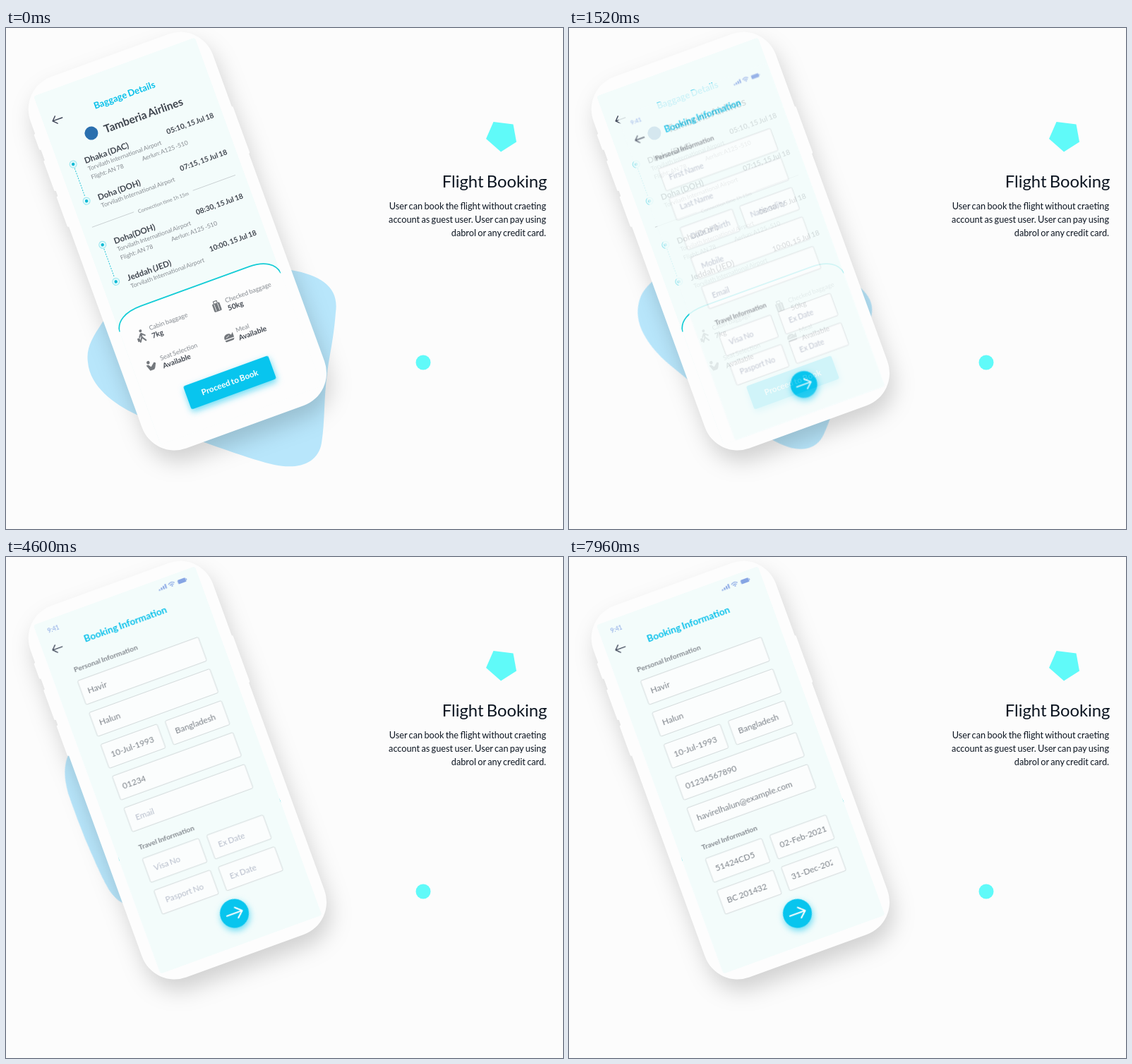
Write an HTML page that moves like this. It is 789 by 710 pixels and loops after 8 s.

```html
<!DOCTYPE html>
<html lang="en">
<head>
<meta charset="utf-8">
<title>Flight Booking</title>
<style>
  html, body { margin: 0; width: 100%; height: 100%; overflow: hidden; background: #fcfcfc; }
  svg { display: block; width: 789px; height: 710px; font-family: Lato, sans-serif; }
  text { word-spacing: -.07em; }
  .phone { filter: drop-shadow(6px 16px 15px rgba(0, 0, 0, .17)); }
  .accent { fill: #08c0ea; }
  .dark { fill: #40464f; font-weight: 700; }
  .soft { fill: #858a90; }
  .hint { fill: #b5bcca; font-size: 11.66px; }
  .value { fill: #7b8188; font-size: 12px; }
  .glow { fill: #08c5ee; filter: drop-shadow(0 4px 5px rgba(8, 197, 238, .6)); }
  .line { fill: none; stroke-linecap: round; stroke-linejoin: round; }
  .box { fill: #fbfdfd; stroke: #d0d7d9; stroke-width: .9; }

  .blob { fill: #b8e6fb; animation: drift 8s linear infinite; }
  @keyframes drift {
    0%, 1%      { transform: translate(338px, 488px); }
    15.5%       { transform: translate(300px, 470px) rotate(13deg) scale(.93); }
    19%         { transform: translate(290px, 461px) rotate(16deg) scale(.915); }
    31%         { transform: translate(261px, 442px) rotate(26deg) scale(.85); }
    47.5%       { transform: translate(214px, 407px) rotate(40deg) scale(.75); }
    66%         { transform: translate(170px, 372px) rotate(53deg) scale(.617); }
    74%         { transform: translate(172px, 385px) rotate(62deg) scale(.45); }
    84.5%, 100% { transform: translate(190px, 380px) rotate(72deg) scale(.3); }
  }

  #form { transform-origin: 247px 630px; animation: zoom 8s infinite; }
  @keyframes zoom {
    0%, 16% { opacity: 0; transform: scale(.5); animation-timing-function: cubic-bezier(.25, .46, .45, .94); }
    21%, 100% { opacity: 1; transform: none; }
  }
</style>
</head>
<body>
<svg viewBox="0 0 789 710">
  <clipPath id="screen"><rect x="3.5" y="104" width="243.5" height="526" rx="4"/></clipPath>

  <path class="blob" d="M-202-70C-215-50-225-35-222-14C-219 20-185 45-153 60C-110 79-75 93-38 106C0 119 20 126 42 131C75 138 104 130 109 100C114 70 112 35 117 2C120-25 126-45 129-85C134-120 110-137 66-145C0-150-150-140-202-70Z"/>

  <g class="phone" fill="#fdfdfd">
    <g transform="rotate(-20)">
      <rect x="-14.6" y="155" width="5" height="24" rx="1.5"/>
      <rect x="-14.6" y="195" width="5" height="46" rx="1.5"/>
      <rect x="-14.6" y="249" width="5" height="46" rx="1.5"/>
      <rect x="259" y="214" width="5" height="71" rx="1.5"/>
      <rect x="-12.6" y="87" width="275" height="560" rx="49"/>
    </g>
  </g>

  <g transform="rotate(-20)">
    <g id="details" clip-path="url(#screen)">
      <rect x="3.5" y="104" width="243.5" height="526" fill="#f3fcfb"/>
      <path id="back" class="line" d="M17 146.6H31.5M22.5 141.1L17 146.6L22.5 152.1" stroke="#3f4658" stroke-width="1.4"/>
      <circle cx="62.7" cy="181.4" r="9.5" fill="#2a6fae"/>
      <path d="M18 307H81M170 307H234" stroke="#c9d0d2" stroke-width=".9"/>
      <path d="M4 630V459C6 445 20 435.5 45 435.5H208C231 435.5 245 445 247 459V630Z" fill="#fdfdfd"/>
      <path class="line" d="M4 459C6 445 20 435.5 45 435.5H208C231 435.5 245 445 247 459" stroke="#14ccd6" stroke-width="1.7"/>
      <rect class="glow" x="62" y="563" width="128" height="35" rx="3"/>
      <g fill="#74787d">
        <g transform="translate(31 475.5)">
          <circle cx="1" cy="-7" r="2"/>
          <path class="line" d="M1-3L0 2L4 8M0 2L-4 8M1-3L5 1M0-3L-3 1" stroke="#74787d" stroke-width="2"/>
          <rect x="-7" y="2" width="3.5" height="5"/>
        </g>
        <g transform="translate(145 473)">
          <path class="line" d="M-2-5V-8H3V-5" stroke="#74787d" stroke-width="1.2"/>
          <rect x="-5" y="-5" width="11" height="12" rx="1.5"/>
          <path d="M-2-4V6M3-4V6" stroke="#fdfdfd" stroke-width=".8"/>
        </g>
        <g transform="translate(30 519.5)">
          <circle cx="-3" cy="-5" r="2.3"/>
          <path d="M-7-2L-4-2L-1 2L5-3L7-1L4 5L2 7H-4Z"/>
        </g>
        <g transform="translate(147 519.5)">
          <path d="M-7 2A6 6 0 0 1 4-2L7-5V2ZM-7 3.5H7L5 6H-6Z"/>
          <path d="M-4 0L1-2" stroke="#fdfdfd" stroke-width=".8"/>
        </g>
      </g>
    </g>

    <g id="form">
      <rect x="3.5" y="104" width="243.5" height="526" rx="4" fill="#f3fcfb"/>
      <use href="#back"/>
      <g fill="#86a5e4">
        <path d="M187.5 119.5v-2h2v2zM190.8 119.5v-3.4h2v3.4zM194.1 119.5v-4.8h2v4.8zM197.4 119.5v-6.4h2v6.4z"/>
        <path class="line" d="M203.2 115.3Q207.3 112 211.4 115.3M205 117.3Q207.3 115.5 209.6 117.3" stroke="#86a5e4" stroke-width="1.3"/>
        <circle cx="207.3" cy="119" r="1"/>
        <rect x="216.5" y="114" width="12" height="6" rx="1.5"/>
        <rect x="229" y="116" width="1" height="2"/>
      </g>
      <circle class="glow" cx="131.3" cy="585.2" r="20.5"/>
      <path class="line" d="M120 585.2H143M134.5 577.5L143 585.2L134.5 593" stroke="#fff" stroke-width="2.1"/>
    </g>
  </g>

  <g fill="#0b1420" text-anchor="end">
    <text x="766.5" y="226" font-size="23.8">Flight Booking</text>
    <g font-size="12.7">
      <text x="765" y="257">User can book the flight without craeting</text>
      <text x="765" y="276">account as guest user. User can pay using</text>
      <text x="765" y="295">dabrol or any credit card.</text>
    </g>
  </g>
  <g fill="#60faf9">
    <path d="M690.5 133L718.5 136.5L723 161.5L701 175.5L680 157Z"/>
    <circle cx="591" cy="474" r="10.5"/>
  </g>
</svg>

<script>
const LOOP = 8000;
const details = document.getElementById('details');
const form = document.getElementById('form');

function add(parent, tag, attrs, content = '') {
  const el = document.createElementNS('http://www.w3.org/2000/svg', tag);
  for (const key in attrs) el.setAttribute(key, attrs[key]);
  el.textContent = content;
  parent.append(el);
  return el;
}

const text = (parent, x, y, content, cls, size, more = {}) =>
  add(parent, 'text', { x, y, class: cls, ...(size && { 'font-size': size }), ...more }, content);

const bold = { 'font-weight': 700 };
const centred = { ...bold, 'text-anchor': 'middle' };

// Flight details
text(details, 125, 151.3, 'Baggage Details', 'accent', 13, centred);
text(details, 81.5, 188.3, 'Tamberia Airlines', 'dark', 15.6);
text(details, 125, 311, 'Connection time 1h 15m', 'soft', 7.1, { 'text-anchor': 'middle' });
text(details, 126, 584.5, 'Proceed to Book', '', 11.66, { ...centred, fill: '#fff' });

const stops = [
  [214, 'Dhaka (DAC)', '05:10, 15 Jul 18'],
  [269.4, 'Doha (DOH)', '07:15, 15 Jul 18'],
  [335.5, 'Doha(DOH)', '08:30, 15 Jul 18'],
  [391, 'Jeddah (JED)', '10:00, 15 Jul 18'],
];
stops.forEach(([y, city, time], i) => {
  text(details, 40.3, y + 5.2, city, 'dark', 11.66);
  text(details, 234, y + 6, time, 'dark', 10.3, { 'text-anchor': 'end' });
  text(details, 40.8, y + 16.5, 'Torvilath International Airport', 'soft', 8.6);
  if (i % 2 === 0) {
    text(details, 41, y + 29.3, 'Flight: AN 78', 'soft', 8.6);
    text(details, 117.5, y + 29.3, 'Aerlun: A125 -510', 'soft', 8.6);
    add(details, 'path', { d: `M23.4 ${y + 6}v43`, stroke: '#27c4d8', 'stroke-dasharray': '2 1.6' });
  }
  add(details, 'circle', { cx: 23.4, cy: y, r: 5, fill: '#e2fafc', stroke: '#9be6ee' });
  add(details, 'circle', { cx: 23.4, cy: y, r: 2.2, fill: '#08b9d4' });
});

const extras = [
  [45, 472.5, 'Cabin baggage', '7kg'],
  [159.5, 472.5, 'Checked baggage', '50kg'],
  [45, 517.8, 'Seat Selection', 'Available'],
  [159.5, 517.3, 'Meal', 'Available'],
];
for (const [x, y, label, value] of extras) {
  text(details, x, y, label, 'soft', 9.07);
  text(details, x, y + 12, value, 'dark', 10.3);
}

// Booking form
text(form, 126.3, 151.6, 'Booking Information', 'accent', 13.6, centred);
text(form, 19.5, 122, '9:41', '', 8.6, { fill: '#86a5e4' });
text(form, 35.8, 187, 'Personal Information', 'soft', 10.3, bold);
text(form, 35.8, 455, 'Travel Information', 'soft', 10.3, bold);

const FULL = 182, HALF = 85, LEFT = 35, RIGHT = 132;
// x, y, width, hint, value, then the times of clearing, typing start and end
const fields = [
  [LEFT, 199.6, FULL, 'First Name', 'Havir', 1960, 2000, 2360],
  [LEFT, 247.5, FULL, 'Last Name', 'Halun', 2600, 2640, 3000],
  [LEFT, 295.5, HALF, 'Date of birth', '10-Jul-1993', 3160, 3200, 3720],
  [RIGHT, 295.5, HALF, 'Nationality', 'Bangladesh', 3760, 3820, 4240],
  [LEFT, 343.4, FULL, 'Mobile', '01234567890', 4280, 4320, 4960],
  [LEFT, 391.4, FULL, 'Email', 'havirelhalun@example.com', 5020, 5060, 5900],
  [LEFT, 467.8, HALF, 'Visa No', '51424CD5', 5960, 6000, 6360],
  [RIGHT, 467.8, HALF, 'Ex Date', '02-Feb-2021', 6380, 6400, 6960],
  [LEFT, 515.7, HALF, 'Pasport No', 'BC 201432', 7040, 7250, 7620],
  [RIGHT, 515.7, HALF, 'Ex Date', '31-Dec-2024', 7660, 7730, 8000],
];
const percent = ms => `${ms / LOOP * 100}%`;
let css = '';
fields.forEach(([x, y, width, hint, value, clear, start, end], i) => {
  add(form, 'rect', { class: 'box', x, y, width, height: 36, rx: 2 });
  text(form, x + 11.3, y + 22.2, hint, 'hint').style.animation = `hide${i} ${LOOP}ms linear infinite`;
  text(form, x + 9, y + 22.5, value, 'value').style.animation = `type${i} ${LOOP}ms linear infinite`;
  css += `
    @keyframes hide${i} {
      0%, ${percent(clear - 1)} { opacity: 1 }
      ${percent(clear)}, 100% { opacity: 0 }
    }
    @keyframes type${i} {
      0%, ${percent(start)} { clip-path: inset(0 100% 0 0) }
      ${percent(end)}, 100% { clip-path: inset(0 0% 0 0) }
    }`;
});
document.head.append(Object.assign(document.createElement('style'), { textContent: css }));
</script>
</body>
</html>
```
